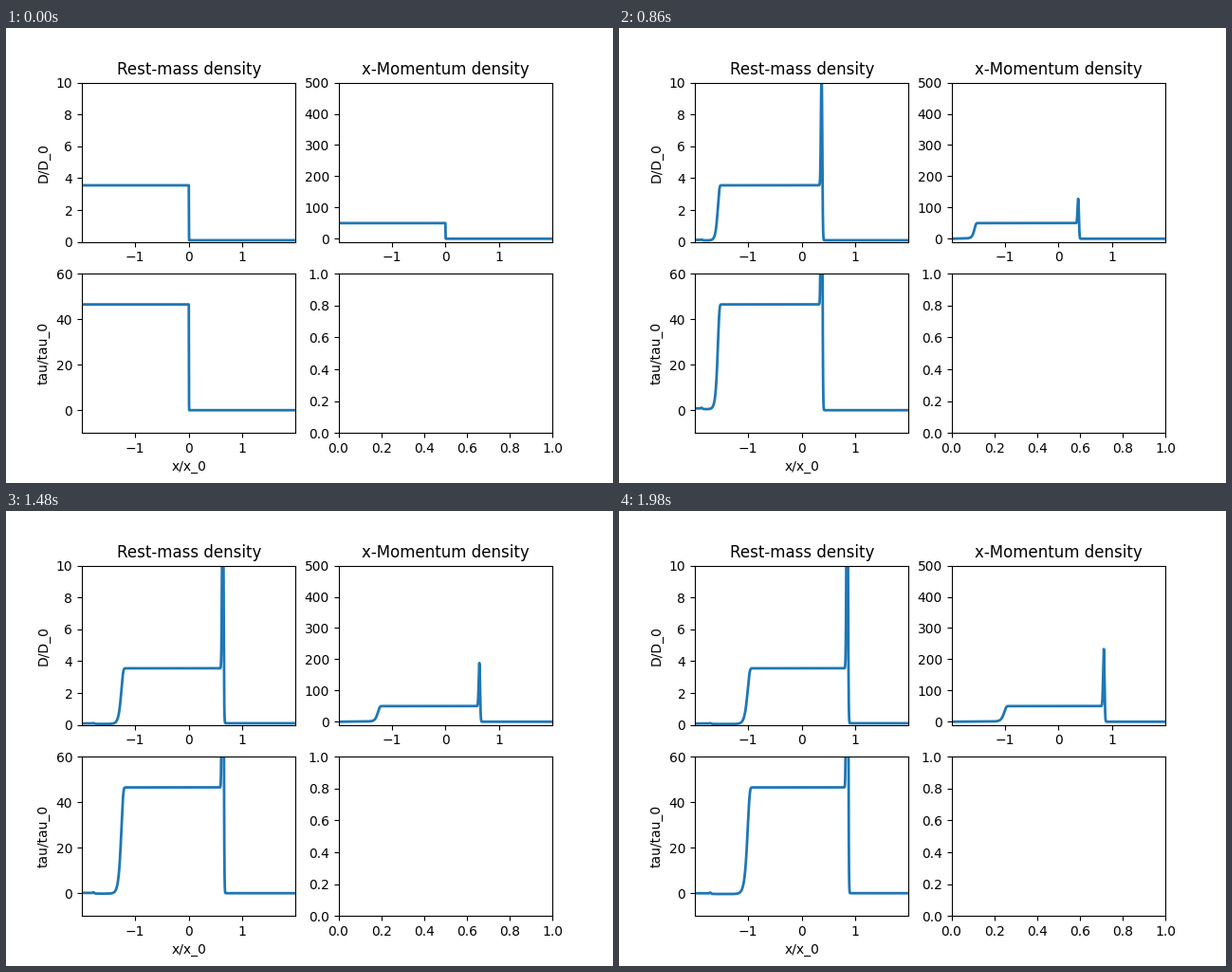
Recreate the animation shown at these times as a matplotlib script. Size 640 px wide and 480 px high, loop 2000 ms.

```python
import numpy as np
import matplotlib.pyplot as plt
from matplotlib.animation import FuncAnimation

FRAMES, INTERVAL = 100, 20
X = np.linspace(-1.995, 1.995, 1597)


def inflow(t):
    """Fraction of the left state that survives behind the trailing edge."""
    w = 0.0275 * t ** 0.35 + 0.0004
    edge = -1.998 + 0.494 * t + 0.37 * w
    u = np.clip((X - edge) / w, -30, 5)
    return 1 - np.exp(-np.exp(u)), edge


def profile(t, left, right, spike, low):
    """Plateau with a trailing edge, a shell spike and a sharp shock."""
    s, _ = inflow(t)
    peak_x = 0.4265 * t + 0.003 * min(1, t / 0.1)
    sigma = 0.002 + 0.0095 * min(1, t / 0.15) + 0.0005 * t
    bell = np.exp(-0.5 * ((X - peak_x) / sigma) ** 2)
    behind = low + (left - low) * s + spike * bell
    ahead = right + (left + spike - right) * bell
    return np.where(X <= peak_x, behind, ahead)


def fields(t):
    age = max(0, t - 0.14)
    spike = age * (114 - 8 * age)
    _, edge = inflow(t)

    ripple_x = -2 + 0.147 * t
    ripple = np.exp(-0.5 * ((X - ripple_x) / 0.014) ** 2)
    upstream = 1 / (1 + np.exp(np.clip((X - ripple_x) / 0.03, -30, 30)))

    d_low = 0.05 + 0.5 * np.exp(-t / 0.35) + 0.04 * ripple + 0.03 * upstream
    s_low = (1 + 6 * np.exp(-t / 0.4)) * np.clip((X + 2) / (edge + 2), 0, 1)
    tau_low = -0.45 + 5 * np.exp(-t / 0.5) + 0.45 * ripple + 0.35 * upstream

    return (profile(t, 3.55, 0.1, 0.093 * spike, d_low),
            profile(t, 50, 0, spike, s_low),
            profile(t, 46.5, 0, 2 * spike, tau_low))


fig, axes = plt.subplots(2, 2, figsize=(6.4, 4.8), dpi=100)
ax_d, ax_s, ax_tau, _ = axes.flat

ax_d.set(title="Rest-mass density", ylabel="D/D_0", ylim=(0, 10))
ax_s.set(title="x-Momentum density", ylim=(-10, 500))
ax_tau.set(xlabel="x/x_0", ylabel="tau/tau_0", ylim=(-10, 60))

lines = []
for ax in (ax_d, ax_s, ax_tau):
    ax.set_xlim(X[0], X[-1])
    ax.set_xticks([-1, 0, 1])
    lines += ax.plot([], [], lw=2, color="C0")


def update(i):
    for line, y in zip(lines, fields(i * INTERVAL / 1000)):
        line.set_data(X, y)
    return lines


anim = FuncAnimation(fig, update, frames=FRAMES, interval=INTERVAL,
                     repeat=True, repeat_delay=0)
plt.show()
```
